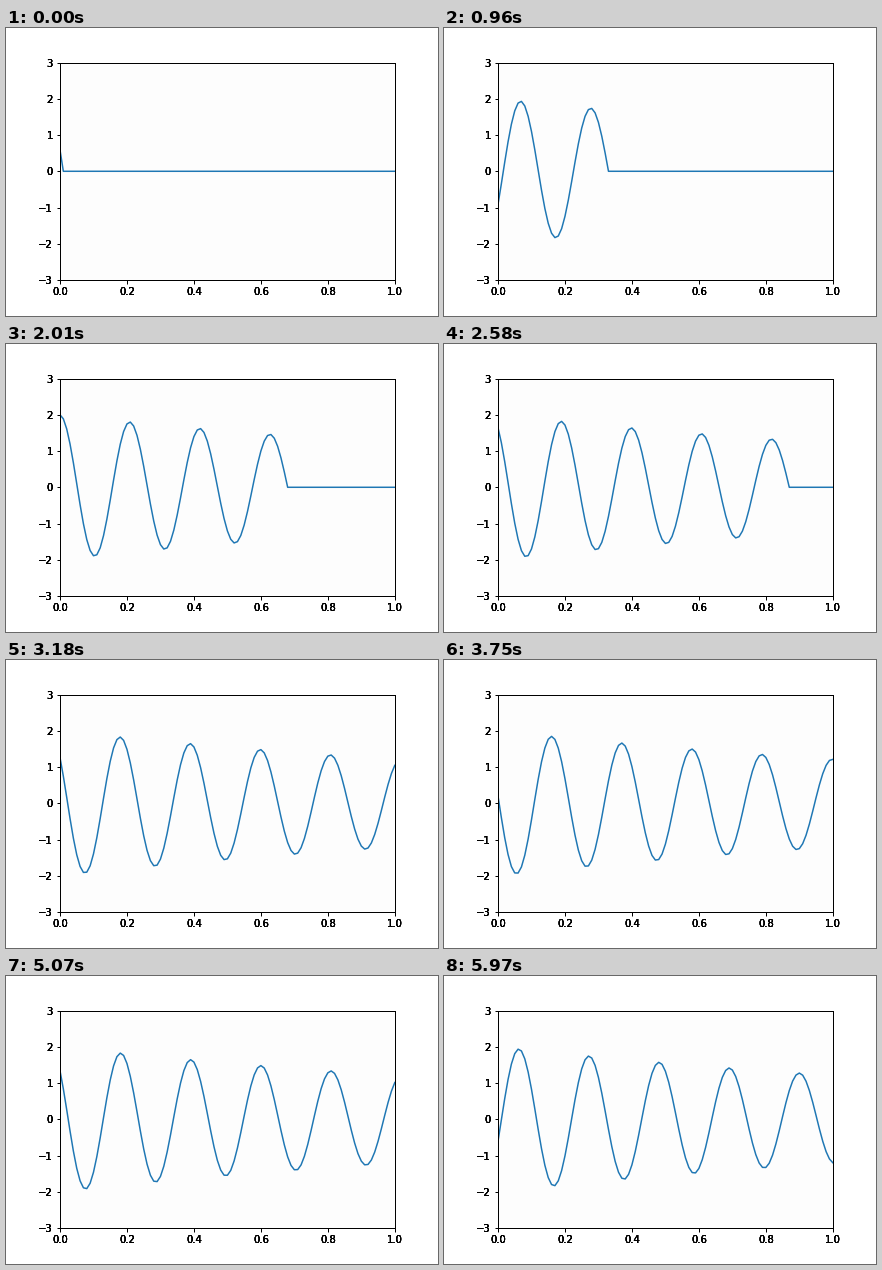
A matplotlib script that plays this animation: 432x288 px, repeating every 6000 ms.

```python
import numpy as np
import matplotlib.pyplot as plt
from matplotlib.animation import FuncAnimation

FRAMES = 200
CELLS = 100          # the wave moves one cell per frame
AMP, OMEGA, DAMPING = 2.0, 0.3, 0.5
LABEL_PASSES = 5     # stacked labels give crisp, heavy digits

plt.rcParams.update({
    "font.family": "DejaVu Sans",
    "font.size": 10,
    "axes.linewidth": 1,
    "xtick.major.width": 1,
    "ytick.major.width": 1,
})

fig = plt.figure(figsize=(6, 4), dpi=72, facecolor="white")
ax = fig.add_axes([0.125, 0.125, 0.775, 0.755], facecolor="#fdfdfd")
ax.set(xlim=(0, 1), ylim=(-3, 3),
       xticks=np.arange(6) / 5, yticks=np.arange(-3, 4))
ax.tick_params(labelbottom=False, labelleft=False)


def label_ticks(pad=7):
    x_tr, x_va, x_ha = ax.get_xaxis_text1_transform(pad)
    y_tr, y_va, y_ha = ax.get_yaxis_text1_transform(pad)
    for _ in range(LABEL_PASSES):
        for x in ax.get_xticks():
            ax.text(x, 0, f"{x:.1f}", transform=x_tr, va=x_va, ha=x_ha)
        for y in ax.get_yticks():
            text = f"{y:.0f}".replace("-", "\N{MINUS SIGN}")
            ax.text(0, y, text, transform=y_tr, va=y_va, ha=y_ha)


label_ticks()

cell = np.arange(CELLS + 1)
x = cell / CELLS
line, = ax.plot(x, np.zeros_like(x), color="#1f77b4", lw=1.5)


def wave(n):
    # Zero ahead of the front, damped sine behind it
    age = np.maximum(n + 1 - cell, 0)
    return AMP * np.exp(-DAMPING * x) * np.sin(OMEGA * age)


def update(n):
    line.set_ydata(wave(n))
    return line,


anim = FuncAnimation(fig, update, frames=FRAMES, interval=30,
                     init_func=lambda: update(0), repeat=True)
plt.show()
```
